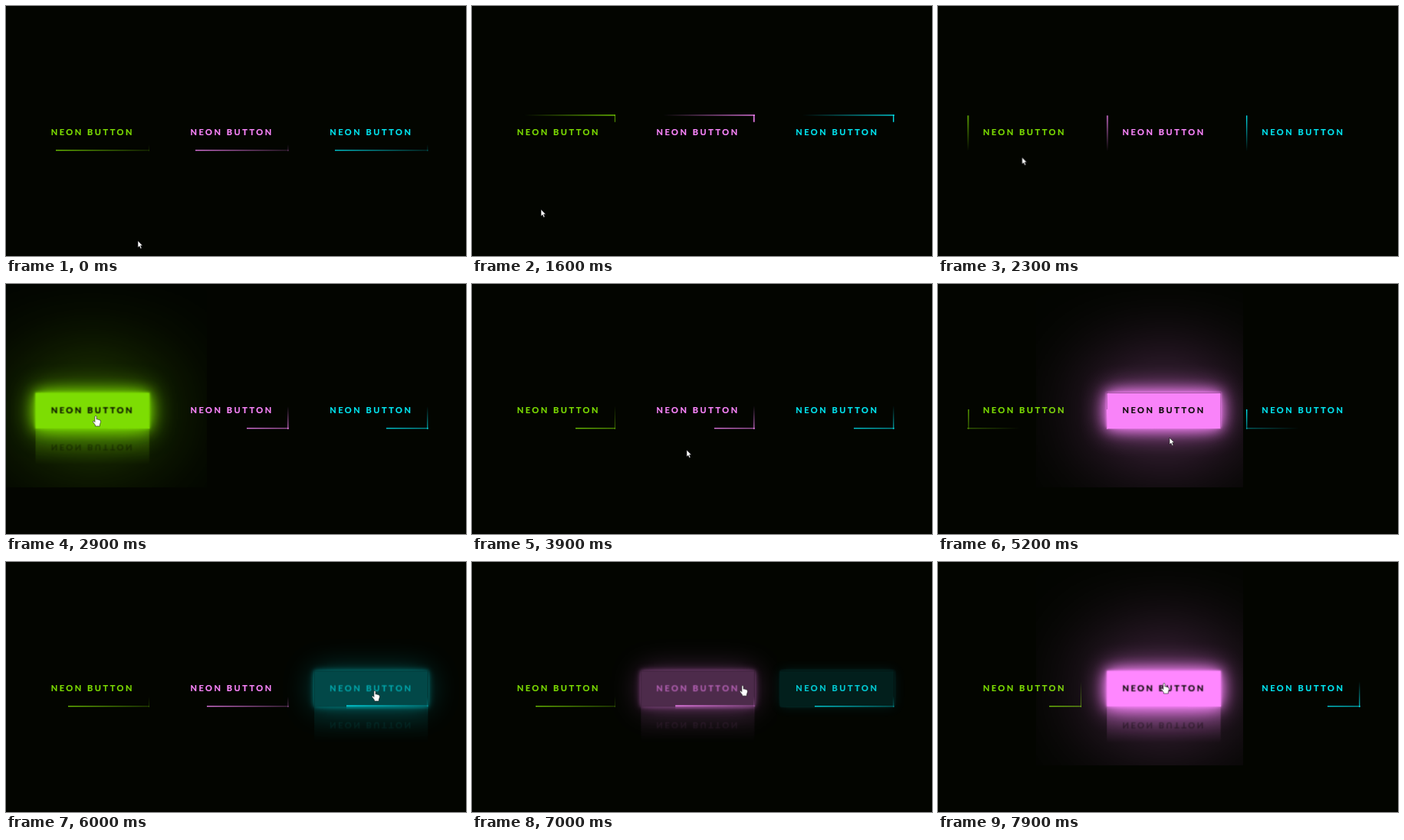
An HTML page that plays this animation: 600x327 px, repeating every 8 s.

```html
<!DOCTYPE html>
<html lang="en">
<head>
<meta charset="utf-8">
<title>Neon buttons</title>
<style>
  html, body { margin: 0; width: 100%; height: 100%; overflow: hidden; background: #030500; }
  #stage { position: relative; width: 600px; height: 327px; overflow: hidden; }
  .zone { position: absolute; inset: 0; height: 266px; }
  .button {
    position: absolute; left: 0; top: 0; width: 216px; height: 68px; overflow: hidden;
    box-sizing: border-box; padding-left: 29.3px;
    transform-origin: 0 0;
    font: 700 16px/66px Lato, sans-serif; letter-spacing: 3.7px; white-space: nowrap;
    -webkit-text-stroke: .3px currentColor;
    color: var(--c);
  }
  .button.over { -webkit-box-reflect: below 1px linear-gradient(transparent, #0005); }
  .button i { position: absolute; }
  .top, .bottom { left: 0; width: 100%; height: 2px; }
  .left, .right { top: 0; width: 2px; height: 100%; }
  .top { top: 0; background: linear-gradient(90deg, transparent, var(--c)); }
  .right { right: 0; background: linear-gradient(180deg, transparent, var(--c)); }
  .bottom { bottom: 0; background: linear-gradient(270deg, transparent, var(--c)); }
  .left { left: 0; background: linear-gradient(360deg, transparent, var(--c)); }
  #cursor { position: absolute; left: -.5px; top: -.3px; width: 1px; height: 1px; overflow: visible; }
  #cursor path { fill: #fff; stroke: #111; stroke-width: .6; stroke-linejoin: round; }
</style>
</head>
<body>
<div id="stage">
  <svg id="cursor">
    <path id="arrow" d="M0 0V9L2 7.2L3.5 10.4L5 9.7L3.6 6.6H6.2Z"/>
    <path id="hand" d="M-1.1 1.2Q0 -.6 1.1 1.2V5L2.4 4.8L3.2 5.4L4.4 5.3L5 6L6 6.2Q6.6 6.6 6.5 8.5L5.4 12V14H-.6V12.4L-3.6 8.4Q-3.6 6.8 -2.4 7.2L-1.1 8.6Z"/>
  </svg>
</div>
<script>
const LOOP = 8000, STEP = 100, FADE = 500;
const SCALE = .6875, LEFT = 38.5, TOP = 142.35, SPACING = 181.75;

// hovers: [enter, leave] in ms; glow: horizontal range it may light
const BUTTONS = [
  { color: '#7ddd03', hovers: [[2400, 3200]], glow: [0, 262] },
  { color: '#ff87ff', hovers: [[4150, 5180], [6900, LOOP]], glow: [128, 398] },
  { color: '#03e9f4', hovers: [[5900, 6700]], glow: [0, 600] }
];

// pointer stops: [ms, x, y]
const STOPS = [[0, 172, 307], [1600, 90, 266], [2900, 117, 172], [3900, 280, 217],
  [5000, 300, 160], [5200, 302, 201], [5800, 400, 195], [6000, 481, 168], [LOOP, 294, 158]];

const EDGES = [['top', 'X', 1], ['right', 'Y', 1], ['bottom', 'X', -1], ['left', 'Y', -1]];

const stage = document.getElementById('stage');
const cursor = document.getElementById('cursor');
const [arrow, hand] = cursor.children;
const animations = [];

function add(parent, className) {
  const el = document.createElement('div');
  el.className = className;
  return parent.appendChild(el);
}

function animate(el, frames, duration, clock) {
  const run = el.animate(frames, { duration, iterations: Infinity });
  run.pause();
  animations.push({ run, clock });
}

const loopClock = t => t;
// one lap of light round a border takes about a second
const borderClock = delay => t => 1705 + t * .9957 - delay;

function hoverFrames({ color, hovers }) {
  const off = { backgroundColor: 'transparent', color, boxShadow: 'none' };
  const on = {
    backgroundColor: color, color: '#050801',
    boxShadow: [5, 25, 50, 200].map(blur => `0 0 ${blur}px ${color}`).join(', ')
  };
  const key = (state, ms) => ({ ...state, offset: Math.min(ms / LOOP, 1), easing: 'ease' });
  const frames = hovers.flatMap(([enter, leave]) => [
    key(off, enter), key(on, enter + FADE), key(on, leave), key(off, leave + FADE)
  ]);
  return [key(off, 0), ...frames, key(off, LOOP)];
}

BUTTONS.forEach((button, n) => {
  const zone = add(stage, 'zone');
  const [from, to] = button.glow;
  zone.style.clipPath = `inset(0 ${600 - to}px 0 ${from}px)`;

  const el = button.el = add(zone, 'button');
  el.style.transform = `translate(${LEFT + n * SPACING}px, ${TOP}px) scale(${SCALE})`;
  el.style.setProperty('--c', button.color);
  el.append('NEON BUTTON');
  animate(el, hoverFrames(button), LOOP, loopClock);

  EDGES.forEach(([name, axis, sign], i) => {
    const edge = el.appendChild(document.createElement('i'));
    edge.className = name;
    const shift = percent => `translate${axis}(${percent * sign}%)`;
    animate(edge, [
      { transform: shift(-100) },
      { transform: shift(100), offset: .5 },
      { transform: shift(100) }
    ], 1000, borderClock(i * 250));
  });
});

stage.append(cursor);
animate(cursor, STOPS.map(([ms, x, y]) => ({
  offset: ms / LOOP, transform: `translate(${x}px, ${y}px)`, easing: 'ease-out'
})), LOOP, loopClock);

function render(ms) {
  const t = Math.floor(ms / STEP) * STEP;
  for (const { run, clock } of animations) run.currentTime = clock(t);

  let anyOver = false;
  for (const { el, hovers } of BUTTONS) {
    const over = hovers.some(([enter, leave]) => t >= enter && t < leave);
    el.classList.toggle('over', over);
    anyOver ||= over;
  }
  arrow.style.display = anyOver ? 'none' : '';
  hand.style.display = anyOver ? '' : 'none';
}

const start = performance.now();
function tick() {
  render((performance.now() - start) % LOOP);
  requestAnimationFrame(tick);
}
tick();
</script>
</body>
</html>
```
